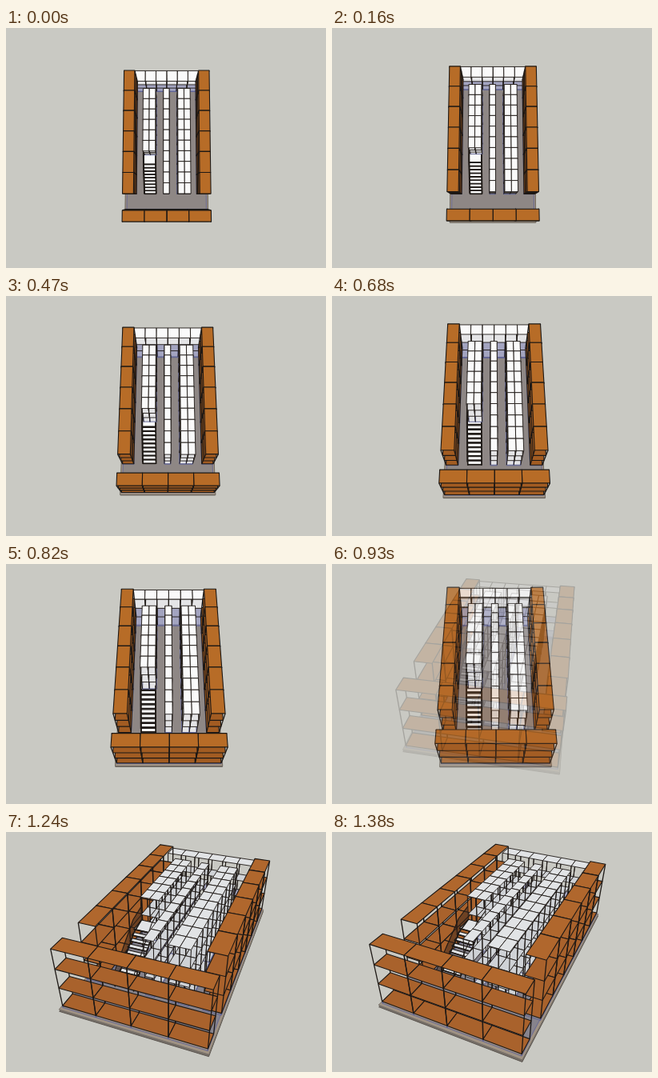
Write an HTML page with a canvas that moves like this. It is 400 px wide and 300 px high and loops after 1.41 s.

```html
<!DOCTYPE html>
<html lang="en">
<head>
<meta charset="utf-8">
<title>Storage room</title>
<style>
html, body { margin: 0; width: 100%; height: 100%; overflow: hidden; background: #c9c9c3; }
canvas { display: block; width: 400px; height: 300px; }
</style>
</head>
<body>
<canvas id="view" width="400" height="300"></canvas>
<script>
const W = 400, H = 300, LOOP = 1410, FOCAL = 500;
const TALL = 1.93;               // rack height; one unit is a rack bay
const FADE = [880, 1125];

// time, yaw, pitch, distance, side offset, depth offset
const TILT = [
  [0, 0, 83, 18.35, .03, .17],
  [160, 0, 80.2, 17.78, .04, .32],
  [470, 0, 71.4, 16.41, .08, .65],
  [680, 0, 66, 15.5, .09, .85],
  [930, 0, 59, 14.3, .13, 1.22],
  [1125, 0, 53.5, 13.4, .15, 1.5]
];
const ORBIT = [
  [880, 9.2, 36.5, 9.73, .334, 2.857],
  [1410, 26.8, 36.5, 9.24, .415, 2.57]
];

const TILT_INK = { wood: '#b76c27', shelf: '#a25c22', white: '#fafafa', pale: '#e4e4e6', floor: '#8e8785' };
const ORBIT_INK = { wood: '#b0672d', shelf: '#a9622c', white: '#e1e3e5', pale: '#cfd2d6', floor: '#86838c' };
const LINE = '#1d1815', BLUE = '#5d6195', LILAC = '#a3a4c0';

const racks = [], steps = [];
const base = [];

// Splits a block into nx by ny bays
function addRacks(kind, x, y, w, d, nx, ny) {
  base.push([x, y, w, d]);
  const bw = w / nx, bd = d / ny;
  for (let i = 0; i < nx; i++)
    for (let j = 0; j < ny; j++)
      racks.push({ kind, x: x + i * bw, y: y + j * bd, w: bw, d: bd, h: kind === 'wood' ? TALL : TALL - .06 });
}
addRacks('wood', -2, 1.25, .5, 5.75, 1, 6);
addRacks('wood', 1.5, 1.25, .5, 5.75, 1, 6);
addRacks('wood', -2, 0, 4, .5, 4, 1);
addRacks('back', -1.5, 6.5, 3, .5, 6, 1);
addRacks('white', -1.1, 3.2, .58, 2.95, 2, 6);
addRacks('white', -.15, 1.25, .27, 4.9, 1, 10);
addRacks('white', .52, 1.25, .58, 4.9, 2, 10);

const STEPS = 9, RUN = .155;
steps.push({ y: 2.65, d: .55, z: 1.08 });
for (let i = 1; i <= STEPS; i++) steps.push({ y: 2.65 - i * RUN, d: RUN, z: 1.08 * (1 - i / (STEPS + 1)) });
const items = racks.concat(steps.map(s => ({ kind: 'step', x: -1.1, w: .58, h: s.z, ...s })));

function pose(keys, t) {
  let i = 0;
  while (i < keys.length - 2 && t > keys[i + 1][0]) i++;
  const a = keys[i], b = keys[i + 1];
  const k = Math.min(1, Math.max(0, (t - a[0]) / (b[0] - a[0])));
  return a.map((v, n) => v + (b[n] - v) * k);
}

function camera([, yaw, pitch, dist, ox, oy]) {
  const rad = Math.PI / 180;
  const sy = Math.sin(yaw * rad), cy = Math.cos(yaw * rad);
  const sp = Math.sin(pitch * rad), cp = Math.cos(pitch * rad);
  const toView = (x, y, z) => {
    y -= 3.5;
    z -= TALL;
    const side = x * cy + y * sy + ox, away = y * cy - x * sy + oy;
    return [side, away * sp + z * cp, dist + away * cp - z * sp];
  };
  return {
    project(x, y, z) {
      const [a, b, c] = toView(x, y, z);
      return [W / 2 + FOCAL * a / c, H / 2 - FOCAL * b / c];
    },
    range: (x, y, z) => Math.hypot(...toView(x, y, z))
  };
}

function drawScene(g, keys, ink, t) {
  const cam = camera(pose(keys, t));

  function path(points, fill, stroke, width = 1) {
    g.beginPath();
    for (const p of points) g.lineTo(...cam.project(...p));
    if (fill) {
      g.closePath();
      g.fillStyle = fill;
      g.fill();
    }
    if (stroke) {
      g.strokeStyle = stroke;
      g.lineWidth = width;
      g.stroke();
    }
  }
  const plate = (x, y, w, d, z) => [[x, y, z], [x + w, y, z], [x + w, y + d, z], [x, y + d, z]];

  function drawRack({ kind, x, y, w, d, h }) {
    const wood = kind === 'wood', levels = 4, low = .07;
    const corners = plate(x, y, w, d, 0);
    let last = 0;
    for (let i = 0; i < levels; i++) {
      const z = low + (h - low) * i / (levels - 1), top = i === levels - 1;
      for (const [cx, cy] of corners)
        path([[cx, cy, last], [cx, cy, z]], null, i ? LINE : BLUE, wood ? 1.3 : 1);
      let fill = wood ? (top ? ink.wood : ink.shelf) : (top ? ink.white : ink.pale);
      if (kind === 'back' && i < 2) fill = LILAC;
      path(plate(x, y, w, d, z), fill, !wood && i === 0 ? BLUE : LINE, wood ? 1.1 : .9);
      last = z;
    }
  }

  function drawStep({ x, y, w, d, z }) {
    const next = z - .108, rail = .45, r = x + w;
    path([[x, y, next], [x, y + d, z], [x, y + d, z + rail], [x, y, next + rail]], 'rgba(62,40,30,.55)');
    path(plate(x, y, w, d, z), ink.white, LINE, 1.1);
    path([[x, y, z], [r, y, z]], null, LINE, 1.6);
    for (const s of [x, r]) {
      path([[s, y + d, z], [s, y, next]], null, LINE, 1.6);
      path([[s, y + d, z + rail], [s, y, next + rail]], null, LINE, 1.1);
    }
  }

  g.fillStyle = '#c9c9c3';
  g.fillRect(0, 0, W, H);
  g.lineJoin = 'round';

  path(plate(-2.06, -.1, 4.12, 7.15, -.07), '#77706a', '#5b554f');
  path(plate(-2.06, -.1, 4.12, 7.15, 0), '#9f9284', '#6d665f', .8);
  path(plate(-1.98, .5, 3.96, 6.45, 0), ink.floor, BLUE, .8);
  for (const [x, y, w, d] of base) path(plate(x, y, w, d, 0).concat([[x, y, 0]]), null, BLUE, .9);

  items
    .map(it => ({ it, far: cam.range(it.x + it.w / 2, it.y + it.d / 2, it.h / 2) }))
    .sort((a, b) => b.far - a.far)
    .forEach(({ it }) => (it.kind === 'step' ? drawStep : drawRack)(it));
}

const view = document.getElementById('view').getContext('2d');
const layer = document.createElement('canvas');
layer.width = W;
layer.height = H;
const over = layer.getContext('2d');

function render(now) {
  const t = now % LOOP;
  const mix = Math.min(1, Math.max(0, (t - FADE[0]) / (FADE[1] - FADE[0])));
  if (mix < 1) drawScene(view, TILT, TILT_INK, t);
  if (mix > 0) {
    drawScene(over, ORBIT, ORBIT_INK, t);
    view.globalAlpha = mix;
    view.drawImage(layer, 0, 0);
    view.globalAlpha = 1;
  }
}

const start = performance.now();
function tick() {
  render(performance.now() - start);
  requestAnimationFrame(tick);
}
tick();
</script>
</body>
</html>
```
